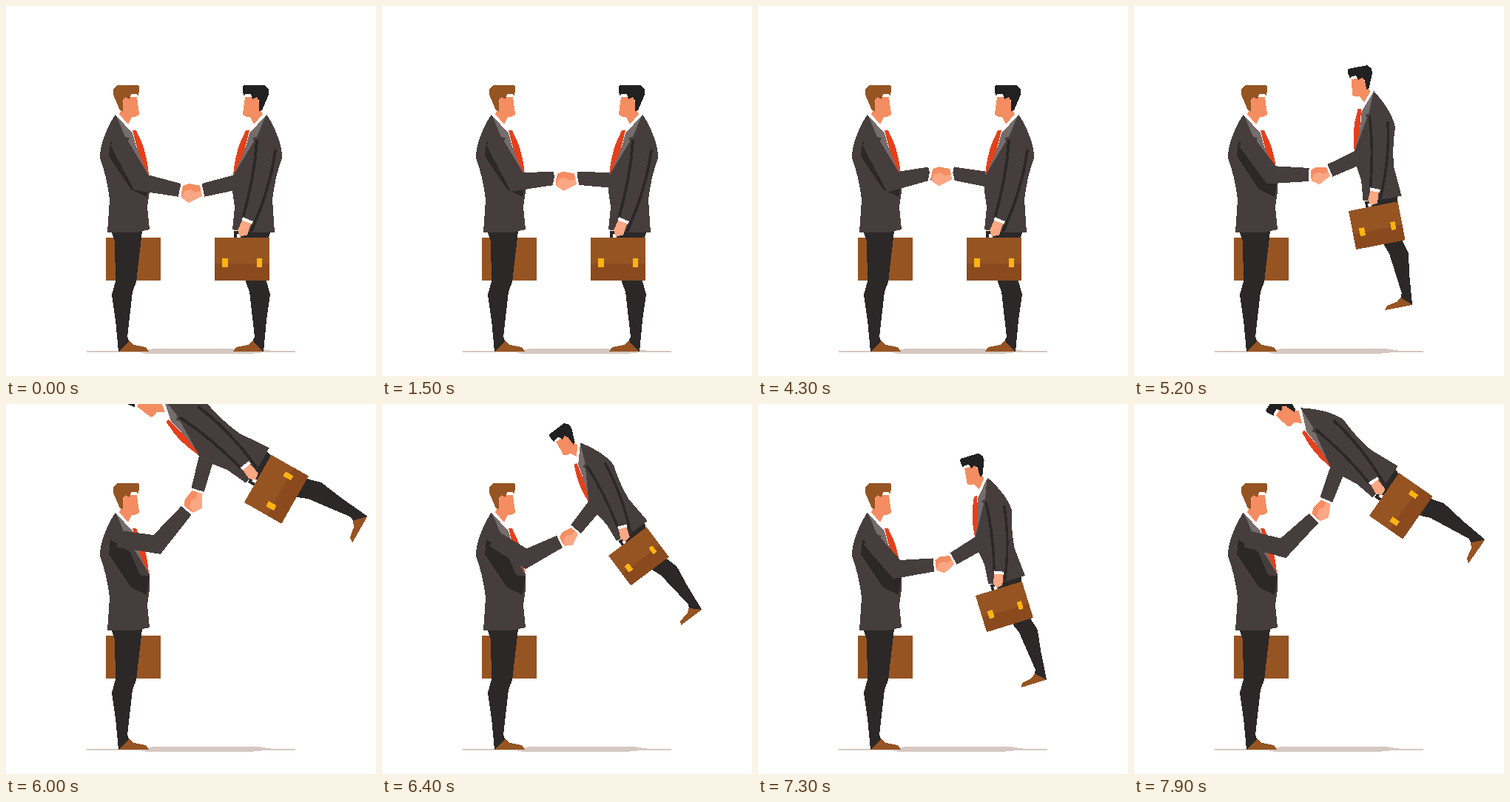
Recreate the animation shown at these times as an HTML page. Size 500 px wide and 500 px high, loop 8000 ms.

```html
<!DOCTYPE html>
<html lang="en">
<head>
<meta charset="utf-8">
<title>Handshake</title>
<style>
  html, body { margin: 0; width: 100%; height: 100%; overflow: hidden; background: #fff; }
  svg { display: block; width: 100vw; height: 100vh; }
  .suit { fill: #463e3d; }
  .dark { fill: #2b2827; }
  .fold { fill: none; stroke: #2b2827; stroke-width: 4; }
  .lapel { fill: #756d6c; }
  .white { fill: #fff; }
  .tie { fill: #e5401c; }
  .skin { fill: #f58d62; }
  .palm { fill: #fba783; }
  .leather { fill: #965423; }
  .leather-low { fill: #8a4a1e; }
  .clasp { fill: #ffb30f; }
</style>
</head>
<body>
<svg viewBox="0 0 500 500" shape-rendering="crispEdges">
  <defs>
    <g id="figure">
      <path class="dark" d="M142 304H184L176 373L171 386L164 447L167 454L152 467L148 425L143 390L148 372L147 318Z"/>
      <path class="leather" d="M152 467L167 453L173 458L189 461L193 467Z"/>
      <path class="suit" d="M148 146Q127 180 127 205Q137 233 140 262L137 306L175 306L194 302L191 272L194 250V230L176 190L165 170Z"/>
      <path class="white" d="M148 147L153 145L166 160L170 156L177 180V190Z"/>
      <path class="lapel" d="M149 148L171 172L176 190L193 229L165 183L167 178L161 177Z"/>
      <path class="tie" d="M171 168H176L179 175Q190 195 193 229Q180 206 174 180Z"/>
      <path class="skin" d="M156 140L160 123H177L180 146Q178 150 170 150L165 160L153 146Z"/>
      <path fill="currentColor" d="M150 107H178Q181 108 180 114L179 121L176 119H169L167 126L161 123L158 128V142L154 141L145 120V113Z"/>
    </g>
  </defs>

  <path fill="#d5c8c1" d="M109 466H180L200 463H340L360 466H391V468H350L330 470H190L180 468H109Z"/>

  <rect class="leather" x="135" y="313" width="74" height="58"/>
  <use href="#figure" color="#965423"/>
  <path class="dark" d="M141 183L168 200L181 231L194 233L190 258L169 248L139 203Z"/>

  <polygon id="rightSleeve" class="suit"/>
  <g id="rightMan">
    <use href="#figure" color="#222121" transform="matrix(-1 0 0 1 500 0)"/>
    <path class="fold" d="M339 181Q336 230 320 286"/>
    <path class="fold" d="M364 194Q357 248 331 305"/>
    <rect class="leather" x="282" y="313" width="74" height="58"/>
    <rect class="leather-low" x="282" y="348" width="74" height="23"/>
    <path class="clasp" d="M292 341h8v12h-8ZM339 341h7v12h-7Z"/>
    <path class="fold" d="M310 313V306H327V313"/>
    <path class="white" d="M320 285L334 291L332 295L319 290Z"/>
    <path class="palm" d="M319 290L331 294L326 310L316 311L313 303Z"/>
  </g>

  <polygon id="leftSleeve" class="suit"/>
  <g id="hands">
    <path class="skin" d="M236 244L247 240L264 243L265 257L247 266L237 259Z"/>
    <path class="palm" d="M237 259L241 250L250 248L255 252L264 250L265 257L247 266Z"/>
    <path stroke="#fff" stroke-width="3" d="M238 240L234 259M263 240L267 259"/>
  </g>
</svg>
<script>
const LOOP = 8000, STEP = 100, BEAT = 1000;
const el = id => document.getElementById(id);

// Matrix turning by `angle` degrees while moving one point to another.
function turn(angle, [x0, y0], [x1, y1]) {
  const r = angle * Math.PI / 180, c = Math.cos(r), s = Math.sin(r);
  return [c, s, -s, c, x1 - c * x0 + s * y0, y1 - s * x0 - c * y0];
}
const still = turn(0, [0, 0], [0, 0]);
const shaken = turn(0, [0, 0], [-4, -32.5]);
const thrownHands = turn(-61, [250.5, 253], [255, 132]);
const thrownMan = turn(-60.4, [319, 342], [365.4, 115.2]);

const mix = (from, to, p) => from.map((v, i) => v + p * (to[i] - v));
const apply = ([a, b, c, d, e, f], [x, y]) => [a * x + c * y + e, b * x + d * y + f];
const setMatrix = (id, m) => el(id).setAttribute('transform', `matrix(${m})`);

// Outline of a tapered limb through its joints, mitred where it bends.
function drawLimb(id, joints, widths) {
  const bones = joints.slice(1).map(([x, y], i) =>
    Math.atan2(y - joints[i][1], x - joints[i][0]));
  const sides = joints.map(([x, y], i) => {
    const before = bones[Math.max(i - 1, 0)], after = bones[Math.min(i, bones.length - 1)];
    const middle = (before + after) / 2;
    const half = widths[i] / 2 / Math.cos((after - before) / 2);
    const dx = half * Math.sin(middle), dy = -half * Math.cos(middle);
    return [[x + dx, y + dy], [x - dx, y - dy]];
  });
  const outline = [...sides.map(s => s[0]), ...sides.map(s => s[1]).reverse()];
  el(id).setAttribute('points', outline.join(' '));
}

function draw(now) {
  const t = Math.floor(now % LOOP / STEP) * STEP;
  const swing = t < BEAT ? 0 : 1 - Math.abs((t - BEAT) % (2 * BEAT) / BEAT - 1);
  const throwing = t >= 5 * BEAT;
  const lift = throwing ? swing : 0;

  const hands = mix(still, throwing ? thrownHands : shaken, swing);
  const man = mix(still, thrownMan, lift);
  const elbow = mix([181, 238], [204, 190], lift);
  setMatrix('hands', hands);
  setMatrix('rightMan', man);
  drawLimb('leftSleeve', [[151, 182], elbow, apply(hands, [235, 249])], [23, 24, 18]);
  drawLimb('rightSleeve', [apply(man, [320, 236]), apply(hands, [266, 249])], [21, 18]);
}

const start = performance.now();
function frame() {
  draw(performance.now() - start);
  requestAnimationFrame(frame);
}
frame();
</script>
</body>
</html>
```
